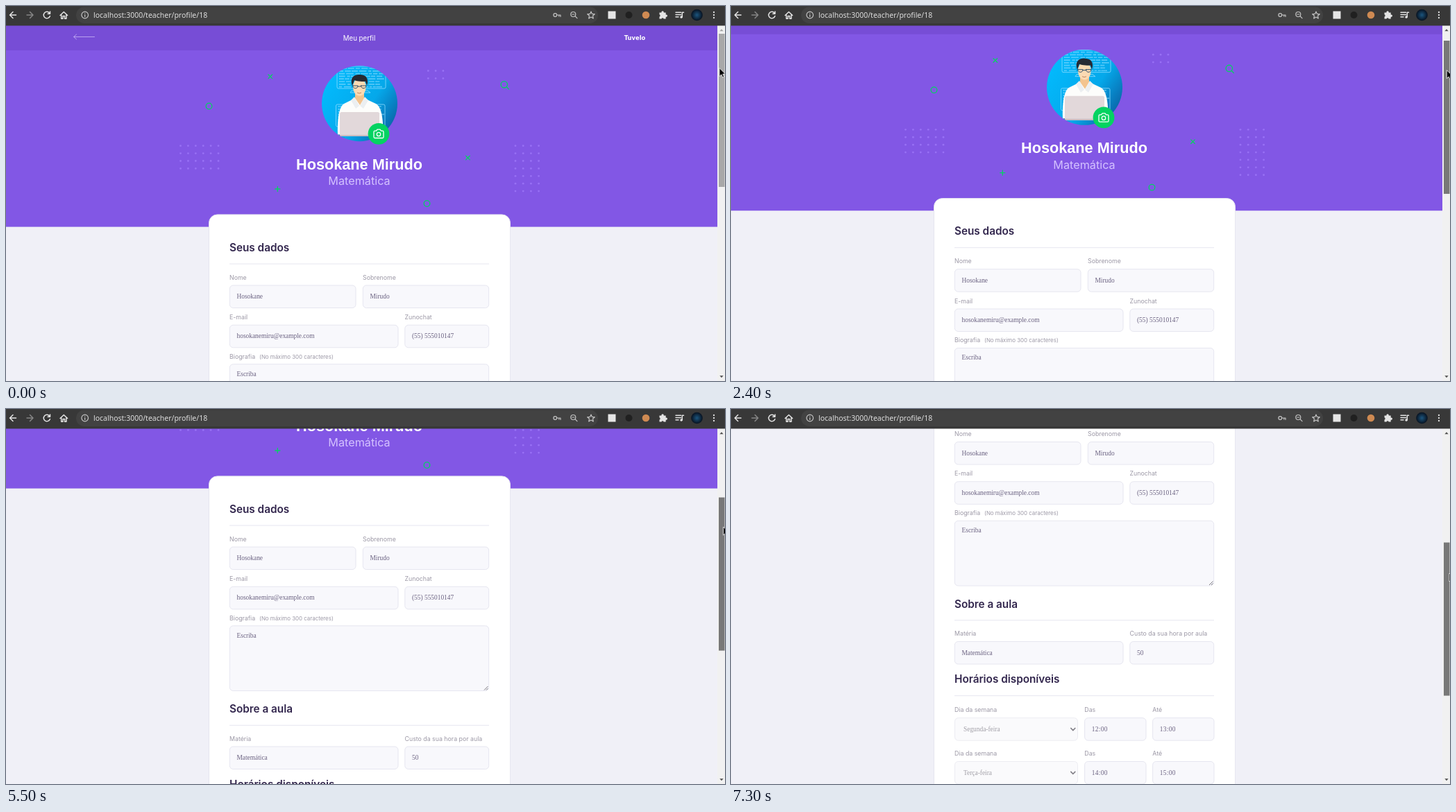
Recreate the animation shown at these times as an HTML page. Size 1036 px wide and 541 px high, loop 8 s.

```html
<!DOCTYPE html>
<html lang="pt-BR">
<head>
<meta charset="utf-8">
<title>Meu perfil</title>
<style>
html, body { margin: 0; width: 100%; height: 100%; overflow: hidden; background: #f0f0f7; }
svg { display: block; width: 1036px; height: 541px; }
text { font-family: Inter, sans-serif; white-space: pre; }
.mid { text-anchor: middle; }
.title { font-size: 15.3px; font-weight: 600; fill: #32264d; }
.label { font-size: 8.8px; fill: #9c98a6; }
.hint { font-size: 7.9px; fill: #9c98a6; }
.value { font: 9.4px "Liberation Serif", serif; fill: #6a6180; }
.time { letter-spacing: .35px; }
.off { fill: #a09ea6; }
.box { fill: #f8f8fc; stroke: #e6e6f0; }
.select { fill: #fafafc; stroke: #ececf2; }
.rule { stroke: #e6e6f0; }
.line { fill: none; stroke-linecap: round; stroke-linejoin: round; }
.green { stroke: #04d361; stroke-width: 1.3; }
.icon { stroke: #e4e4e4; stroke-width: 1.5; }
.thin { stroke: #c4c4c4; stroke-width: 1.2; }
</style>
</head>
<body>
<svg viewBox="0 0 1036 541">
  <defs>
    <linearGradient id="sky" x1="0" y1=".15" x2="1" y2=".85">
      <stop offset="0" stop-color="#02bcff"/>
      <stop offset=".6" stop-color="#05a8ea"/>
      <stop offset="1" stop-color="#0b599c"/>
    </linearGradient>
    <radialGradient id="night">
      <stop offset="0" stop-color="#1b557e"/>
      <stop offset="1" stop-color="#07111f"/>
    </radialGradient>
    <clipPath id="round"><circle cx="509.5" cy="140.7" r="54.5"/></clipPath>
  </defs>
  <rect width="1036" height="541" fill="#f0f0f7"/>

  <g id="page">
    <rect y="28" width="1026" height="290.6" fill="#8257e5"/>
    <rect y="28" width="1026" height="36" fill="#774dd6"/>
    <path class="line" d="M127.5 44.5H97.5l4-3.5m-4 3.5l4 3.500" stroke="#b9a0f0"/>
    <text class="mid" x="509" y="49.6" font-size="9.7" fill="#fff">Meu perfil</text>
    <text class="mid" x="906" y="49" style="font:bold 8.4px 'DejaVu Sans', sans-serif" fill="#fff">Tuvelo</text>
    <g id="dots" fill="#9871f5"></g>
    <g class="line green">
      <path d="M378 99l5.600 5.600m0-5.600l-5.600 5.600M662.700 216.200l5.600 5.600m0-5.600l-5.600 5.600M391.300 260.500v7m-3.500-3.500h7"/>
      <circle cx="292.5" cy="144.5" r="4.3"/>
      <circle cx="606.5" cy="285" r="4.3"/>
      <circle cx="717.8" cy="113.3" r="4.7"/>
      <path d="M721.300 116.800l3 3"/>
    </g>

    <g clip-path="url(#round)">
      <rect x="455" y="86" width="109" height="110" fill="url(#sky)"/>
      <g id="code" fill="none" stroke="#8fdcff" stroke-width=".8"></g>
      <path d="M496 125l2-3h23l4 3z" fill="none" stroke="#8fdcff" stroke-width=".8"/>
      <path d="M478 187c-1-24 2-42 9-46l16-8h13l17 8c9 5 11 26 10 46z" fill="#fdfdfb"/>
      <path d="M503 124h13v9l-6 10-7-10z" fill="#f3c48f"/>
      <path d="M502 131l7 13-5 4-7-12zM517 131l-7 13 5 4 7-12z" fill="#eceff1"/>
      <ellipse cx="509.300" cy="117" rx="9.300" ry="12.800" fill="#fbdab2"/>
      <path d="M499 115c-4-11 2-17 11-16 9 0 13 6 10 16l-2-6c-6 0-11 0-16-2z" fill="#262a33"/>
      <path class="line" d="M499.500 115h7.500c0 5-7 5-7.500 0zM511.500 115h7.500c-.5 5-7.500 5-7.500 0zM507 116h4.500" stroke="#2d4d6a"/>
      <path d="M506 125q3 2 6 0" fill="none" stroke="#b8734c" stroke-width=".8"/>
      <path d="M466 186.500h90" stroke="#0a6ea8" stroke-width="2"/>
      <rect x="481" y="153" width="57" height="35" rx="2.5" fill="#e2d8da"/>
      <path d="M481 186h57v2h-57z" fill="#c9bcc1"/>
    </g>
    <circle cx="537" cy="184.3" r="15.4" fill="#04d361"/>
    <g class="line" stroke="#fff" stroke-width="1.3">
      <path d="M531.500 180.200h2l1.500-2h4l1.500 2h2q1.500 0 1.500 1.500v7.300q0 1.500-1.500 1.500h-11q-1.500 0-1.500-1.500v-7.300q0-1.500 1.500-1.500z"/>
      <circle cx="537" cy="185" r="2.7"/>
    </g>
    <text class="mid" x="509" y="235.5" style="font:bold 21.7px 'Liberation Sans', sans-serif" fill="#fff">Hosokane Mirudo</text>
    <text class="mid" x="509" y="258" font-size="16.2" fill="#d4c2ff">Matemática</text>

    <rect x="292.5" y="300.9" width="434" height="700" rx="12" fill="#fff" stroke="#e6e6f0"/>
    <g id="form"></g>
    <path d="M689 609.500l5.500-5.500M692 609.500l2.500-2.500" stroke="#77757d"/>
  </g>

  <rect x="1025" y="28" width="11" height="513" fill="#f1f1f1"/>
  <path id="up" d="M1028.300 36.200h5.400l-2.700-3z"/>
  <path d="M1028.300 533.300h5.400l-2.700 3z" fill="#505050"/>
  <rect id="thumb" x="1027" width="8.5" height="221"/>

  <rect width="1036" height="28.4" fill="#383838"/>
  <rect x="101" y="1.5" width="752" height="23.5" rx="11.75" fill="#424242"/>
  <g class="line icon">
    <path d="M14.500 13H5.500m4.500-4.500L5.500 13l4.500 4.500"/>
    <path d="M30 13h9m-4.500-4.500L39 13l-4.500 4.500" stroke="#858585"/>
    <path d="M62.700 10.200a4.700 4.700 0 1 0 .7 4.300M63.500 8v3.300h-3.300"/>
    <path d="M78 13.500l5.300-5 5.300 5M79.700 12.500v5.700h2.300v-3.700h2.600v3.700h2.300v-5.700"/>
  </g>
  <g class="line thin">
    <circle cx="113.700" cy="13" r="4.800"/>
    <path d="M113.700 12.600v2.900m0-5.200v.1"/>
    <circle cx="791.300" cy="13" r="2.400"/>
    <path d="M794 13h5v2.300m-2.200-2.300v2"/>
    <circle cx="817.300" cy="12" r="3.500"/>
    <path d="M820 14.700l3 3M815.700 12h3.200"/>
    <path d="M843 8l1.500 3.400 3.700.3-2.800 2.500.9 3.700-3.300-2-3.300 2 .9-3.700-2.800-2.500 3.700-.3z"/>
  </g>
  <rect x="867.5" y="7.5" width="11" height="11" fill="#e6e6e6"/>
  <circle cx="897.5" cy="13" r="5" fill="#202020"/>
  <circle cx="922" cy="13" r="5.3" fill="#cf8a52"/>
  <path d="M941.500 9.500h3a1.700 1.700 0 1 1 3.200 0h3v3a1.700 1.700 0 1 1 0 3.200v2.800h-3a1.700 1.700 0 0 0-3.200 0h-3v-3a1.700 1.700 0 0 0 0-3.200z" fill="#e4e4e4"/>
  <path class="line icon" d="M965 9.200h7.500M965 12.500h7.500M965 15.800h4M974.300 16V9.200h2.200"/>
  <circle cx="973" cy="16" r="1.7" fill="#e4e4e4"/>
  <circle cx="995.5" cy="13" r="8.3" fill="url(#night)"/>
  <path d="M1020 9v.1m0 3.900v.1m0 3.900v.1" stroke="#e4e4e4" stroke-width="2.3" stroke-linecap="round"/>
  <text x="126" y="17" style="font:10.5px 'Noto Sans', sans-serif" fill="#dedede">localhost:3000/teacher/profile/18</text>

  <path id="cursor" d="M0 0v12l2.800-2.600 1.900 4.200 2-.9-1.900-4.100h3.700z" fill="#000" stroke="#fff" stroke-width=".8"/>
</svg>
<script>
const $ = id => document.getElementById(id);

function grid(x, y, cols, rows, step) {
  let out = '';
  for (let i = 0; i < cols * rows; i++) {
    const cx = x + i % cols * step;
    const cy = y + Math.floor(i / cols) * 10.9;
    out += `<circle cx="${cx}" cy="${cy}" r="1.4"/>`;
  }
  return out;
}
$('dots').innerHTML = grid(251.5, 201.7, 6, 4, 10.9) +
  grid(734, 201.7, 4, 7, 11.2) + grid(608.3, 93.5, 3, 2, 10.8);

let seed = 7;
const rand = () => (seed = seed * 16807 % 2147483647) / 2147483647;

// A screen outline filled with rows of short strokes
function panel(x, y, w, h) {
  let d = '';
  for (let row = y + 3; row < y + h - 1; row += 3.8) {
    for (let px = x + 3; px < x + w - 8;) {
      const len = 3 + rand() * 8;
      d += `M${px.toFixed(1)} ${row.toFixed(1)}h${len.toFixed(1)}`;
      px += len + 1.2 + rand() * 2;
    }
  }
  return `<rect x="${x}" y="${y}" width="${w}" height="${h}" rx="2"/>` +
    `<path d="${d}" stroke-width="1.7" stroke-dasharray="1.6 .5" opacity=".75"/>`;
}
$('code').innerHTML = panel(477, 87, 70, 32) + panel(475.5, 142, 70.5, 32);

const text = (cls, x, y, s) => `<text class="${cls}" x="${x}" y="${y}">${s}</text>`;
const box = (x, y, right, h = 32.5, cls = 'box') =>
  `<rect class="${cls}" x="${x}" y="${y}" width="${right - x}" height="${h}" rx="5"/>`;
const title = (y, s) => text('title', 322, y, s) +
  `<path class="rule" d="M322 ${y + 18.3}H696"/>`;
const field = (x, y, right, label, value, cls = 'value') =>
  text('label', x, y - 8.4, label) + box(x + .3, y, right) +
  text(cls, x + 10.5, y + 19, value);

function slot(y, day, from, to) {
  return text('label', 322, y - 8.4, 'Dia da semana') +
    box(322.5, y, 499.5, 32.5, 'select') + text('value off', 335, y + 19.3, day) +
    `<path class="line" d="M489.8 ${y + 14.8}l3 3.2 3-3.2" stroke="#85838a" stroke-width="1.7"/>` +
    field(509.3, y, 598, 'Das', from, 'value time') +
    field(607.3, y, 696, 'Até', to, 'value time');
}

$('form').innerHTML =
  title(353.7, 'Seus dados') +
  field(322, 403, 504, 'Nome', 'Hosokane') +
  field(514, 403, 695.7, 'Sobrenome', 'Mirudo') +
  field(322, 460.3, 565, 'E-mail', 'hosokanemiru@example.com') +
  field(574.5, 460.3, 695.7, 'Zunochat', '(55) 555010147') +
  text('label', 322, 508.5, 'Biografia') +
  text('hint', 365, 508.5, '(No máximo 300 caracteres)') +
  box(322.3, 516.8, 695.7, 93.7) + text('value', 332.5, 533.5, 'Escriba') +
  title(642, 'Sobre a aula') +
  field(322, 691, 565, 'Matéria', 'Matemática') +
  field(574.5, 691, 695.7, 'Custo da sua hora por aula', '50') +
  title(750.9, 'Horários disponíveis') +
  slot(801.2, 'Segunda-feira', '12:00', '13:00') +
  slot(864, 'Terça-feira', '14:00', '15:00');

// Start time, scroll offset, pointer x, pointer y
const poses = [
  [0, 0, 1028, 89.5], [100, 0, 1028, 86], [600, 0, 1028.5, 81.5], [1300, 0, 1029, 81.5],
  [5100, 183.5, 1034.5, 161], [5500, 204, 1033.5, 170],
  [6100, 224.5, 1033, 179.5], [6700, 291, 1034, 208], [7300, 355.5, 1035, 237]
];

// The first drag moves in 100 ms steps, slow and then steady
function drag(t) {
  const n = Math.min(10, Math.floor((t - 1700) / 100));
  const late = Math.max(0, n - 4);
  const y = n < 5 ? 2.1 * n : 8.5 + 5.333 * late - .13 * late * (10 - n);
  return [t, y, 1029.5 + .6 * late, 82.3 + y * .44];
}

function draw(now) {
  const t = now % 8000;
  const pose = t >= 1800 && t < 5100 ? drag(t) : poses.filter(p => p[0] <= t).pop();
  const [, y, px, py] = pose;
  $('page').setAttribute('transform', `translate(0 ${-y})`);
  $('thumb').setAttribute('y', 40 + y / 2.33);
  $('thumb').setAttribute('fill', t < 1300 ? '#a8a8a8' : '#787878');
  $('up').setAttribute('fill', y > 0 ? '#505050' : '#a3a3a3');
  $('cursor').setAttribute('transform', `translate(${px} ${py})`);
  requestAnimationFrame(draw);
}
draw(0);
</script>
</body>
</html>
```
